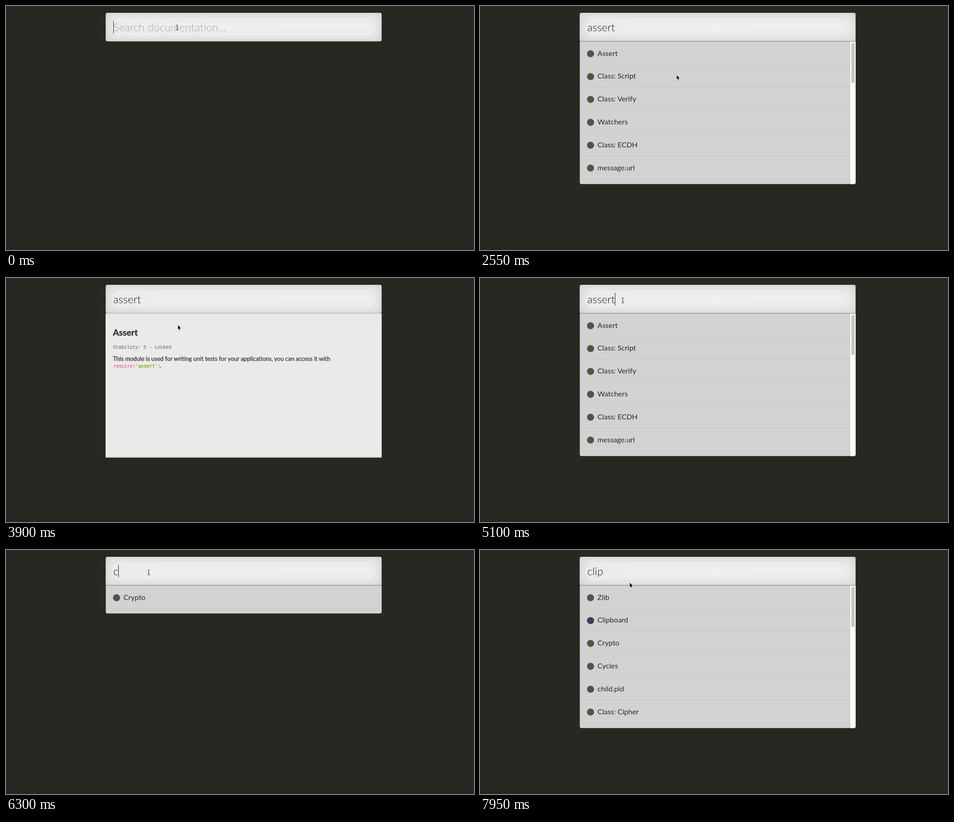
These frames come from a looping animation (1034 px wide and 542 px high, 8 s). An HTML page:

```html
<!DOCTYPE html>
<html lang="en">
<head>
<meta charset="utf-8">
<title>Documentation search</title>
<style>
  html, body { margin: 0; width: 100%; height: 100%; overflow: hidden; background: #272822; }
  svg { display: block; width: 100%; height: 100%; }
  text { font-family: Lato, sans-serif; white-space: pre; }
  .query { font-size: 24px; font-weight: 300; }
  .label { font-size: 16px; fill: #24292c; }
  .mono { font-family: "Liberation Mono", monospace; font-size: 10.24px; fill: #555; }
  .code { font-family: "DejaVu Sans Mono", monospace; font-size: 10.2px; }
  .body { font-size: 13px; fill: #2c2d2e; stroke: #2c2d2e; stroke-width: .25px; }
</style>
</head>
<body>
<svg viewBox="0 0 1034 542" xmlns="http://www.w3.org/2000/svg">
  <defs>
    <clipPath id="listClip"><rect id="listEdge" x="220.5" y="60" width="609.5" rx="4"/></clipPath>
    <clipPath id="docClip"><rect id="docEdge" x="220" y="79" width="610"/></clipPath>
    <clipPath id="barClip"><rect x="220.5" y="15" width="609.5" height="63.5" rx="4"/></clipPath>
    <linearGradient id="glow">
      <stop offset="0" stop-color="#ebebeb"/>
      <stop offset=".25" stop-color="#efefee"/>
      <stop offset="1" stop-color="#f0f0ef"/>
    </linearGradient>
  </defs>
  <rect width="1034" height="542" fill="#272822"/>
  <rect y="538" width="1034" height="4" fill="#242520"/>

  <g id="list" clip-path="url(#listClip)">
    <rect x="220" y="60" width="610" height="340" fill="#d2d2d2"/>
    <g id="rows"></g>
    <g id="scroll">
      <rect x="818" y="79" width="12" height="320" fill="#fafafa"/>
      <rect x="820.7" y="82" width="6.6" height="89" rx="3.3" fill="#c2c2c2"/>
    </g>
  </g>

  <g id="doc" clip-path="url(#docClip)">
    <rect x="220" y="79" width="610" height="320" fill="#eaeae9"/>
    <rect x="220" y="79" width="610" height="17" fill="#e8e8e9"/>
    <rect x="220" y="395.5" width="610" height="3.5" fill="#d9dbdc"/>
    <text x="236.3" y="128" font-size="19.2" font-weight="700" fill="#2a2b2c" stroke="#2a2b2c" stroke-width=".3">Assert</text>
    <text class="mono" x="236.3" y="156.6">Stability: 5 - Locked</text>
    <text class="body" x="236.3" y="184.4">This module is used for writing unit tests for your applications, you can access it with</text>
    <text class="code" x="237" y="199.3"><tspan fill="#e8436f">require</tspan><tspan fill="#8b8b8b">(</tspan><tspan fill="#6b9c0a" stroke="#6b9c0a" stroke-width=".25">'assert'</tspan><tspan fill="#8b8b8b">)</tspan></text>
    <text class="body" x="341" y="199.3">.</text>
  </g>

  <g clip-path="url(#barClip)">
    <rect x="220" y="15" width="610" height="64" fill="#d6d6d6"/>
    <rect x="221" y="16.5" width="608" height="60.5" rx="14" fill="#dcdcdc"/>
    <rect x="225.5" y="20.5" width="600" height="53" rx="17" fill="#e3e3e3"/>
    <rect x="233" y="27" width="584" height="40" rx="18" fill="#ebebeb"/>
    <rect x="240" y="38" width="563.5" height="17" rx="8" fill="url(#glow)"/>
  </g>
  <rect x="220.5" y="15.5" width="609" height="62.5" rx="4" fill="none" stroke="#bdbdbd" stroke-width=".8"/>
  <rect id="rule" x="220.5" y="78" width="609.5" height="1.2"/>
  <text id="query" class="query" x="237" y="56.2"></text>
  <rect id="caret" y="33" width="1" height="28" fill="#222"/>

  <g id="beam" fill="none">
    <path d="M-2.5-5.8Q0-5.8 0-4.2Q0-5.8 2.5-5.8M0-4.5V4.5M-2.5 5.8Q0 5.8 0 4.2Q0 5.8 2.5 5.8M-1.3 1.8H1.3" stroke="#fff" stroke-opacity=".55" stroke-width="2.2"/>
    <path d="M-2.5-5.8Q0-5.8 0-4.2Q0-5.8 2.5-5.8M0-4.5V4.5M-2.5 5.8Q0 5.8 0 4.2Q0 5.8 2.5 5.8M-1.3 1.8H1.3" stroke="#222"/>
  </g>
  <path id="arrow" d="M0 0V11.2L2.5 8.9L4.2 12.7L6.1 11.9L4.4 8.2H7.8Z" fill="#000" stroke="#fff" stroke-width=".8"/>
</svg>
<script>
const LOOP = 8000, TOP = 79, ROW = 50.8, FULL = 395.6;
const $ = id => document.getElementById(id);

const ASSERT = ["Assert", "Class: Script", "Class: Verify", "Watchers", "Class: ECDH", "message.url"];
const PARTIAL = ["Addons", "Assert", "Class: Cipher", "Class: Script", "Watchers", "Class: Hash"];
const CLI = ["Zlib", "Clipboard", "Cycles", "Class: Cipher", "Crypto", "child.pid"];
const CLIP = ["Zlib", "Clipboard", "Crypto", "Cycles", "child.pid", "Class: Cipher"];

// Each step changes only the listed parts of the state; list and doc hold the bottom edge.
const STEPS = [
  [0, { text: "", caret: true, list: 0, doc: 0, rows: [], beam: true, x: 378, y: 48 }],
  [300, { caret: false }],
  [750, { text: "a", caret: true }],
  [900, { text: "as" }],
  [1050, { text: "ass" }],
  [1200, { list: 99, rows: ["Addons"] }],
  [1350, { text: "asse", list: 141 }],
  [1500, { text: "asser", list: 268, rows: PARTIAL }],
  [1650, { text: "assert", list: FULL, rows: ASSERT }],
  [2100, { caret: false }],
  [2250, { beam: false, x: 396, y: 88 }],
  [2400, { x: 424, y: 132 }],
  [2550, { x: 434.3, y: 152.8 }],
  [2700, { x: 416, y: 132 }],
  [2850, { x: 388, y: 109 }],
  [3000, { list: 0 }],
  [3150, { doc: 170 }],
  [3300, { doc: 320 }],
  [3450, { doc: 399 }],
  [3900, { x: 379.6, y: 104 }],
  [4050, { x: 350, y: 72 }],
  [4200, { beam: true, x: 322, y: 42 }],
  [4350, { x: 317, y: 50 }],
  [4500, { doc: 0 }],
  [4650, { list: 268 }],
  [4800, { list: FULL }],
  [4950, { caret: true }],
  [5100, { x: 315.5, y: 50 }],
  [5250, { text: "asser" }],
  [5400, { text: "asse" }],
  [5550, { text: "ass", rows: PARTIAL }],
  [5700, { text: "as" }],
  [5850, { text: "a" }],
  [6000, { text: "", list: 0 }],
  [6150, { text: "c", list: 99, rows: ["Crypto"] }],
  [6300, { list: 141 }],
  [6450, { text: "cl", list: 268, rows: CLI }],
  [6600, { text: "cli", list: 330 }],
  [6750, { text: "clip" }],
  [6900, { list: FULL }],
  [7050, { rows: CLIP }],
  [7500, { caret: false }],
  [7800, { beam: false, x: 326, y: 64 }],
  [7950, { x: 330.6, y: 72 }]
];

function show(el, on) { el.style.display = on ? "" : "none"; }

function add(parent, tag, attrs) {
  const el = document.createElementNS("http://www.w3.org/2000/svg", tag);
  for (const key in attrs) el.setAttribute(key, attrs[key]);
  return parent.appendChild(el);
}

const rowParts = ASSERT.map(() => {
  const g = add($("rows"), "g");
  return {
    g,
    icon: add(g, "circle", { cx: 244.2, r: 7.8 }),
    label: add(g, "text", { class: "label", x: 259.6 }),
    line: add(g, "rect", { x: 220, width: 610, height: 1, fill: "#c5c5c5" })
  };
});

function stateAt(t) {
  const state = {};
  for (const [start, change] of STEPS) {
    if (start > t) break;
    Object.assign(state, change);
  }
  return state;
}

function drawRows(s) {
  rowParts.forEach(({ g, icon, label, line }, i) => {
    const name = s.rows[i];
    show(g, name);
    if (!name) return;
    const top = TOP + i * ROW;
    const h = i ? ROW : Math.min(ROW, s.list - TOP);
    icon.setAttribute("cy", top + h / 2 + 1.6);
    icon.setAttribute("fill", name === "Clipboard" ? "#36405a" : "#4a5743");
    label.setAttribute("y", top + h / 2 + 6.2);
    label.textContent = name;
    line.setAttribute("y", top + h - .4);
  });
}

function draw(t) {
  const s = stateAt(t);
  show($("list"), s.list);
  if (s.list) {
    $("listEdge").setAttribute("height", s.list - 60);
    show($("scroll"), s.list === FULL);
    drawRows(s);
  }
  show($("doc"), s.doc);
  if (s.doc) $("docEdge").setAttribute("height", s.doc - TOP);
  show($("rule"), s.list || s.doc);
  $("rule").setAttribute("fill", s.list ? "#8c8c8c" : "#c3c3c3");

  const query = $("query");
  query.textContent = s.text || "Search documentation...";
  query.setAttribute("fill", s.text ? "#1d1d1d" : "#a6a6a6");
  show($("caret"), s.caret);
  const width = s.text ? query.getComputedTextLength() : 0;
  $("caret").setAttribute("x", Math.floor(237 + width));

  show($("beam"), s.beam);
  show($("arrow"), !s.beam);
  $(s.beam ? "beam" : "arrow").setAttribute("transform", `translate(${s.x} ${s.y})`);
}

const begin = performance.now();
function tick() {
  draw((performance.now() - begin) % LOOP);
  requestAnimationFrame(tick);
}
tick();
</script>
</body>
</html>
```
